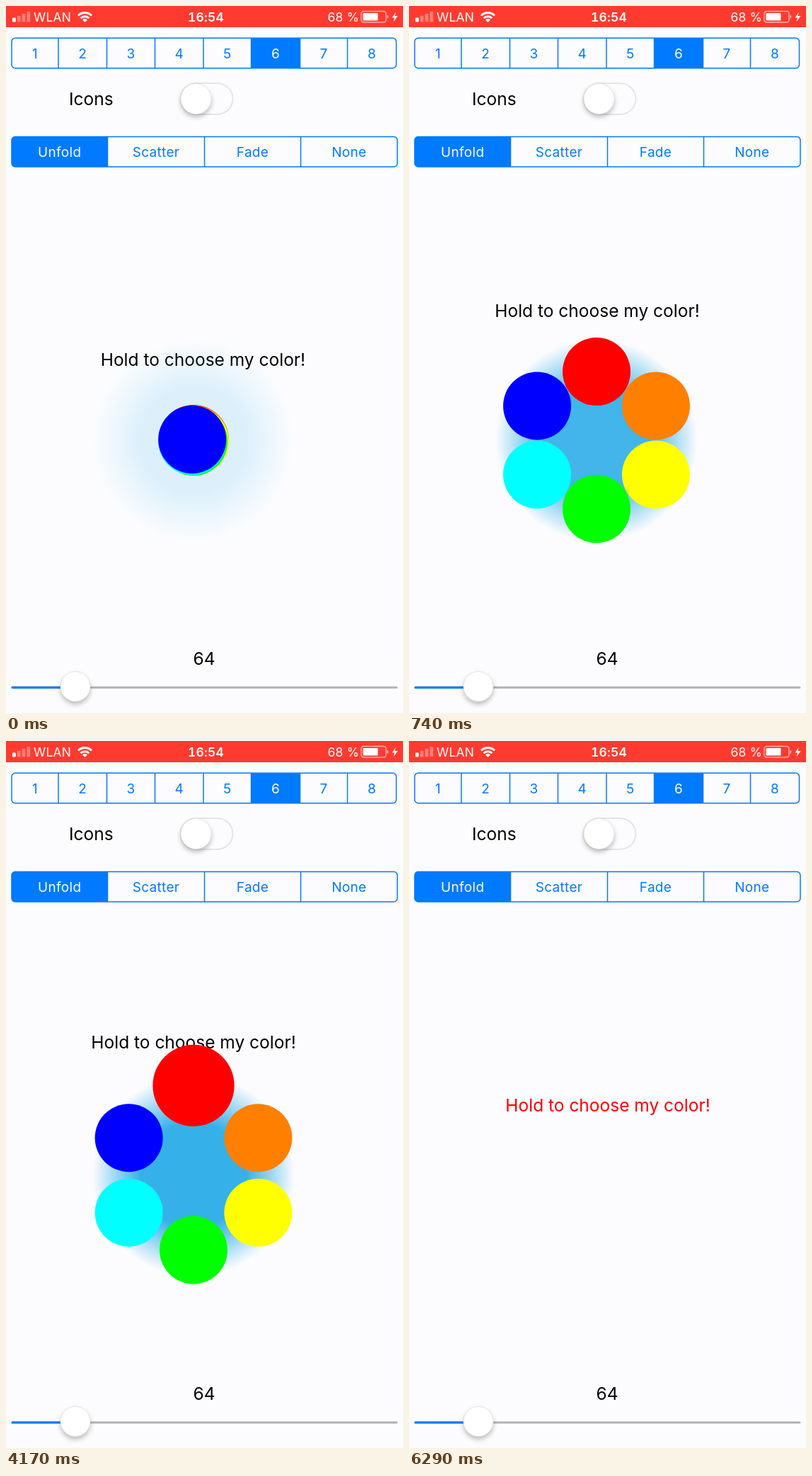
Write an HTML page that moves like this. It is 561 by 998 pixels and loops after 6.39 s.

```html
<!DOCTYPE html>
<html lang="en">
<head>
<meta charset="utf-8">
<title>Color menu</title>
<style>
  html, body { margin: 0; width: 100%; height: 100%; overflow: hidden; background: #fcfcfe; }
  svg { display: block; width: 561px; height: 998px; }
  text { font: 24.5px Inter, Roboto, sans-serif; }
  .seg text { font-size: 19px; letter-spacing: .3px; text-anchor: middle; }
  .status text { font-size: 17.4px; letter-spacing: .3px; fill: #fff; }
  .status .clock { font-weight: 600; font-variant-numeric: tabular-nums; text-anchor: middle; }
  .mid { text-anchor: middle; }
  .knob { fill: #fff; stroke: #e4e4e2; stroke-width: 1; filter: drop-shadow(0 4px 3px rgba(0, 0, 0, .24)); }
</style>
</head>
<body>
<svg viewBox="0 0 561 998">
  <defs>
    <radialGradient id="halo">
      <stop offset=".52" stop-color="#36b0e8"/>
      <stop offset="1" stop-color="#36b0e8" stop-opacity="0"/>
    </radialGradient>
  </defs>

  <g class="status">
    <rect width="561" height="30" fill="#ff3b30"/>
    <g id="signal" fill="#fff"></g>
    <text x="39" y="22">WLAN</text>
    <g fill="none" stroke="#fff" stroke-width="3">
      <path d="M102 13.5a13.4 13.4 0 0 1 19 0"/>
      <path d="M105.7 17.2a8.2 8.2 0 0 1 11.6 0"/>
    </g>
    <path d="M111.5 23l-3.4-3.5a4.8 4.8 0 0 1 6.8 0z" fill="#fff"/>
    <text class="clock" x="282.5" y="22">16:54</text>
    <text x="454.500" y="22">68 %</text>
    <rect x="502" y="7.500" width="35" height="15.500" rx="3.500" fill="none" stroke="#fff" stroke-opacity=".6" stroke-width="1.400"/>
    <rect x="504.500" y="10" width="21" height="10.500" rx="1" fill="#fff"/>
    <path d="M538.500 12.500a3 3 0 0 1 0 5.500z" fill="#fff" fill-opacity=".6"/>
    <path d="M551 8.500l-5.500 8h3.500l-1.500 6 6-8.500h-4z" fill="#fff"/>
  </g>

  <g class="seg" id="counts"></g>
  <text x="89" y="140">Icons</text>
  <rect x="246.500" y="109" width="74" height="44" rx="22" fill="none" stroke="#e5e5e3" stroke-width="2"/>
  <circle class="knob" cx="268.500" cy="131" r="21.500"/>
  <g class="seg" id="modes"></g>

  <text class="mid" x="280" y="930">64</text>
  <path d="M9 962H552" stroke="#b2b2b4" stroke-width="3" stroke-linecap="round"/>
  <path d="M9 962H98" stroke="#007aff" stroke-width="3" stroke-linecap="round"/>
  <circle class="knob" cx="98" cy="960.500" r="21"/>

  <text class="mid" id="label">Hold to choose my color!</text>
  <g id="menu"><circle id="glow" cx="265" cy="613" r="143" fill="url(#halo)"/></g>
</svg>
<script>
const LOOP = 6390, CENTER = [265, 613], RADIUS = 48, REACH = 105.5, RELEASE = 5190;
const BLUE = '#007aff', PAPER = '#fcfcfe';
const COLORS = ['#f00', '#ff8000', '#ff0', '#0f0', '#0ff', '#00f'];
// [color index, grow start, shrink start]
const HOVERS = [[4, 1510, 2200], [3, 2200, 2980], [0, 3890, 9999]];
// [time, progress] of the opening
const OPENING = [[0, .1], [460, .553], [740, .8], [1000, 1]];

const $ = id => document.getElementById(id);
function add(parent, tag, attrs, text = '') {
  const el = document.createElementNS('http://www.w3.org/2000/svg', tag);
  set(el, attrs);
  el.textContent = text;
  return parent.appendChild(el);
}
function set(el, attrs) {
  for (const key in attrs) el.setAttribute(key, attrs[key]);
}
const clamp = v => Math.min(1, Math.max(0, v));
const mix = (a, b, k) => a + (b - a) * k;

// cubic-bezier(x1, 0, .58, 1)
function bezier(x1, t) {
  if (t <= 0 || t >= 1) return clamp(t);
  let lo = 0, hi = 1, s;
  for (let i = 0; i < 24; i++) {
    s = (lo + hi) / 2;
    const x = 3 * s * (1 - s) * ((1 - s) * x1 + s * .58) + s ** 3;
    if (x < t) lo = s; else hi = s;
  }
  return s * s * (3 - 2 * s);
}
const easeOut = t => bezier(0, t);
const easeInOut = t => bezier(.42, t);

function segments(group, edges, top, labels, selected) {
  const left = edges[0], width = edges[edges.length - 1] - left, height = 42.5;
  const box = { x: left, y: top, width, height, rx: 5 };
  add(group, 'rect', { ...box, fill: BLUE, style:
    `clip-path: inset(0 ${left + width - edges[selected + 1]}px 0 ${edges[selected] - left}px)` });
  add(group, 'rect', { ...box, fill: 'none', stroke: BLUE, 'stroke-width': 1.5 });
  labels.forEach((label, i) => {
    if (i) add(group, 'path', { d: `M${edges[i]} ${top}v${height}`, stroke: BLUE, 'stroke-width': 1.5 });
    add(group, 'text', { x: (edges[i] + edges[i + 1]) / 2, y: top + 28.3,
      fill: i === selected ? PAPER : BLUE }, label);
  });
}

for (let i = 0; i < 4; i++)
  add($('signal'), 'rect', { x: 9 + 6.8 * i, y: 16.5 - 2.8 * i, width: 4.8, height: 6 + 2.8 * i,
    rx: 1, opacity: i ? .35 : 1 });
segments($('counts'), [8, 74, 142.5, 210.5, 279, 346.5, 415.5, 482.5, 551.5], 45.2, [...'12345678'], 5);
segments($('modes'), [8, 143.5, 280.5, 416.5, 553], 184.5, ['Unfold', 'Scatter', 'Fade', 'None'], 0);
const dots = COLORS.map(fill => add($('menu'), 'circle', { fill }));

function opening(time) {
  for (let i = 1; i < OPENING.length; i++) {
    const [t0, p0] = OPENING[i - 1], [t1, p1] = OPENING[i];
    if (time < t1) return mix(p0, p1, (time - t0) / (t1 - t0));
  }
  return 1;
}

function draw(time) {
  const released = time >= RELEASE;
  const p = opening(time);
  const lift = released ? 1 - easeOut((time - 5134) / 1100) : easeOut(p);
  set($('label'), { x: mix(281, 265, lift), y: mix(523, 433.5, lift), fill: released ? '#f00' : '#000' });
  set($('menu'), { visibility: released ? 'hidden' : 'visible' });
  set($('glow'), { opacity: lift });

  const reach = REACH * easeInOut(p);
  dots.forEach((dot, i) => {
    let scale = 1;
    for (const [index, grow, shrink] of HOVERS)
      if (index === i)
        scale += .2 * (easeInOut((time - grow) / 200) - easeInOut((time - shrink) / 200));
    const angle = Math.PI * (i / 3 - .5);
    set(dot, {
      cx: CENTER[0] + reach * scale * Math.cos(angle),
      cy: CENTER[1] + reach * scale * Math.sin(angle),
      r: RADIUS * scale
    });
  });
}

const start = performance.now();
function tick() {
  draw((performance.now() - start) % LOOP);
  requestAnimationFrame(tick);
}
tick();
</script>
</body>
</html>
```
